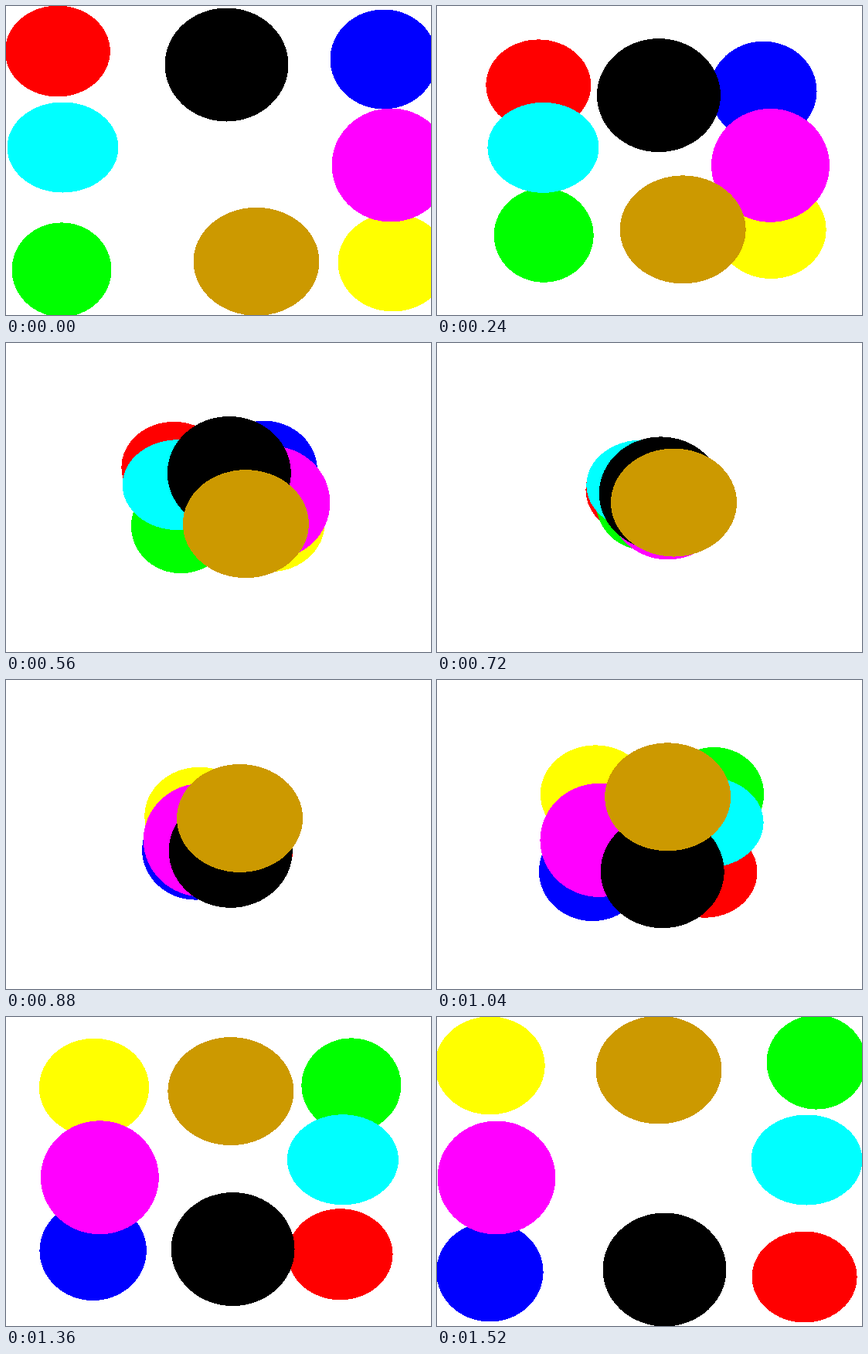
An HTML page for the animation above (1.6 s loop, 550 by 400 pixels).

```html
<!DOCTYPE html>
<html lang="en">
<head>
<meta charset="utf-8">
<title>Crossing ellipses</title>
<style>
  html, body { margin: 0; width: 100%; height: 100%; overflow: hidden; background: #fff; }
  svg { display: block; width: 550px; height: 400px; shape-rendering: crispEdges; }
</style>
</head>
<body>
<svg id="stage" viewBox="0 0 550 400"></svg>
<script>
const STEP = 80, STEPS = 20;

// colour, radii, start centre, end centre; listed back to front
const discs = [
  ['#f00', 68, 59, 66.8, 58.5, 475.6, 336.5],
  ['#00f', 69.2, 64.5, 488.7, 69, 68.4, 330],
  ['#0f0', 64.5, 61, 72, 341.4, 491, 58.6],
  ['#ff0', 71.2, 63.5, 500.7, 332, 68.5, 62.9],
  ['#0ff', 72, 58.5, 73.5, 183, 478.5, 185],
  ['#f0f', 76.5, 73.5, 498, 206, 77, 208],
  ['#000', 80, 73.5, 285.5, 76, 294.5, 327],
  ['#c90', 81.5, 70, 324, 330.8, 287, 68.5],
].map(([fill, rx, ry, x0, y0, x1, y1]) => {
  const el = document.createElementNS('http://www.w3.org/2000/svg', 'ellipse');
  const set = attrs => Object.entries(attrs).forEach(([k, v]) => el.setAttribute(k, v));
  set({ fill, rx, ry });
  stage.append(el);
  return p => set({ cx: x0 + (x1 - x0) * p, cy: y0 + (y1 - y0) * p });
});

function draw() {
  const step = Math.floor(performance.now() / STEP) % STEPS;
  discs.forEach(move => move(step / (STEPS - 1)));
  requestAnimationFrame(draw);
}
draw();
</script>
</body>
</html>
```
